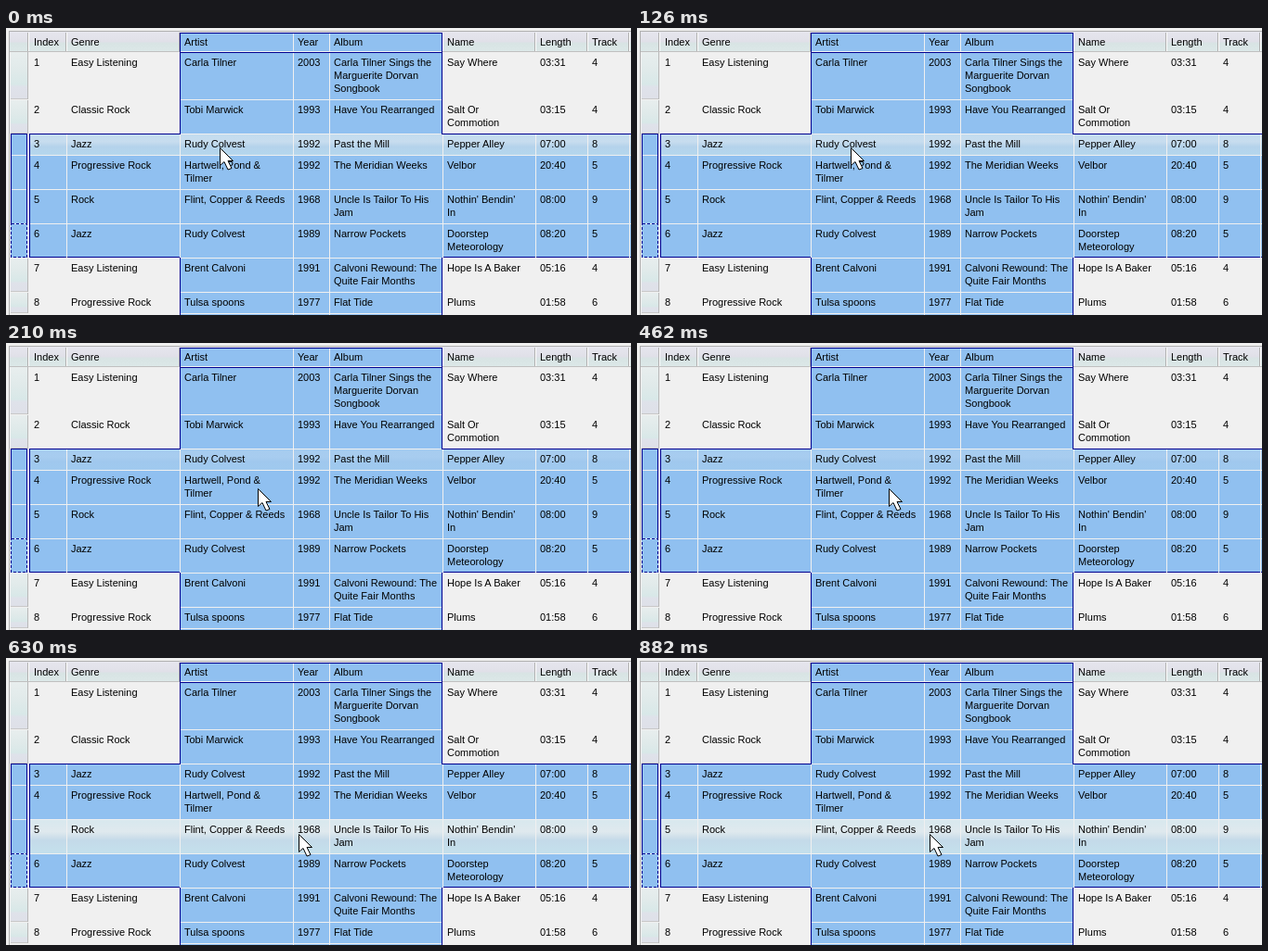
Recreate the animation shown at these times as an HTML page. Size 673 by 310 pixels, loop 1.05 s.

```html
<!DOCTYPE html>
<html lang="en">
<head>
<meta charset="utf-8">
<title>Music table</title>
<style>
html, body { margin: 0; width: 100%; height: 100%; overflow: hidden; background: #f0f0f0; }
svg { display: block; width: 673px; height: 310px; shape-rendering: crispEdges; }
text { font: 11px "Liberation Sans", Arial, sans-serif; fill: #000; white-space: pre; }
</style>
</head>
<body>
<svg id="stage" viewBox="0 0 673 310">
  <defs>
    <linearGradient id="head" x2="0" y2="1">
      <stop stop-color="#e6e6ee"/><stop offset=".5" stop-color="#e0e0e8"/>
      <stop offset=".6" stop-color="#d8e4e4"/><stop offset="1" stop-color="#dce8e8"/>
    </linearGradient>
    <linearGradient id="side" x2="0" y2="1">
      <stop stop-color="#e8eeee"/><stop offset=".4" stop-color="#e0eaea"/>
      <stop offset=".68" stop-color="#d8e8e8"/><stop offset=".74" stop-color="#dfe2ea"/><stop offset="1" stop-color="#dee0e8"/>
    </linearGradient>
    <linearGradient id="glow" x2="0" y2="1">
      <stop stop-color="#d8e8ee"/><stop offset=".35" stop-color="#dfe9ee"/>
      <stop offset=".5" stop-color="#d0e0ea"/><stop offset=".6" stop-color="#c4dae9"/><stop offset="1" stop-color="#c4e0ec"/>
    </linearGradient>
  </defs>
</svg>
<script>
const BLUE = '#90c0f0', NAVY = '#000090', LINE = '#f0f0f0';
const WIDTH = 673, HEIGHT = 310;
const columnX = [25, 65, 187, 309, 348, 470, 570, 626, 671];
const rowY = [26, 77, 114, 137, 174, 211, 248, 285, 308];
const titles = ['Index', 'Genre', 'Artist', 'Year', 'Album', 'Name', 'Length', 'Track'];
const songs = [
  ['1', 'Easy Listening', 'Carla Tilner', '2003', 'Carla Tilner Sings the\nMarguerite Dorvan\nSongbook', 'Say Where', '03:31', '4'],
  ['2', 'Classic Rock', 'Tobi Marwick', '1993', 'Have You Rearranged', 'Salt Or\nCommotion', '03:15', '4'],
  ['3', 'Jazz', 'Rudy Colvest', '1992', 'Past the Mill', 'Pepper Alley', '07:00', '8'],
  ['4', 'Progressive Rock', 'Hartwell, Pond &\nTilmer', '1992', 'The Meridian Weeks', 'Velbor', '20:40', '5'],
  ['5', 'Rock', 'Flint, Copper & Reeds', '1968', 'Uncle Is Tailor To His\nJam', "Nothin' Bendin'\nIn", '08:00', '9'],
  ['6', 'Jazz', 'Rudy Colvest', '1989', 'Narrow Pockets', 'Doorstep\nMeteorology', '08:20', '5'],
  ['7', 'Easy Listening', 'Brent Calvoni', '1991', 'Calvoni Rewound: The\nQuite Fair Months', 'Hope Is A Baker', '05:16', '4'],
  ['8', 'Progressive Rock', 'Tulsa spoons', '1977', 'Flat Tide', 'Plums', '01:58', '6']
];
const stage = document.getElementById('stage');

function add(tag, attributes) {
  const node = document.createElementNS('http://www.w3.org/2000/svg', tag);
  for (const key in attributes) node.setAttribute(key, attributes[key]);
  return stage.appendChild(node);
}
const box = (x, y, width, height, fill) => add('rect', { x, y, width, height, fill });
const across = (x1, x2, y, color) => box(x1, y, x2 - x1, 1, color);
const down = (x, y1, y2, color) => box(x, y1, 1, y2 - y1, color);
function write(text, x, y) {
  text.split('\n').forEach((line, i) => { add('text', { x, y: y + 14 * i }).textContent = line; });
}

// Header, with the selected columns
across(3, WIDTH, 3, '#b0b0b0');
down(3, 3, HEIGHT, '#b0b0b0');
box(4, 4, WIDTH, 21, 'url(#head)');
across(4, WIDTH, 25, '#c0c0c0');
[24, ...columnX.slice(1)].forEach(x => {
  down(x - 1, 5, 25, '#b0b0b0');
  down(x, 5, 25, '#fff');
});
box(187, 5, 283, 20, BLUE);
across(187, 470, 5, NAVY);
across(187, 470, 25, LINE);
[309, 348].forEach(x => down(x, 6, 25, LINE));

// Selection and hovered row
box(187, 26, 283, HEIGHT, BLUE);
box(25, 114, WIDTH, 134, BLUE);
const hover = box(26, 115, WIDTH, 22, 'url(#glow)');

// Row headers
songs.forEach((song, i) => {
  const y = rowY[i], height = rowY[i + 1] - y, selected = i > 1 && i < 6;
  box(5, y, 18, height, selected ? BLUE : 'url(#side)');
  if (!selected) {
    across(5, 23, y + height - 1, '#c8c8c8');
    down(23, y, y + height, '#b8b8b8');
  }
});

// Grid and selection borders
const rowBorder = y => {
  across(25, 187, y, NAVY);
  across(470, WIDTH, y, NAVY);
};
rowBorder(247);
columnX.slice(1).forEach(x => down(x, 26, HEIGHT, LINE));
rowY.slice(1).forEach(y => across(5, WIDTH, y, LINE));
rowBorder(114);
across(187, 470, 26, NAVY);
[187, 469].forEach(x => {
  down(x, 5, 115, NAVY);
  down(x, 248, HEIGHT, NAVY);
});
down(25, 114, 248, NAVY);
across(5, 23, 114, NAVY);
[5, 22].forEach(x => down(x, 114, 211, NAVY));
add('rect', { x: 5.5, y: 211.5, width: 17, height: 36, fill: 'none', stroke: NAVY, 'stroke-dasharray': '3 2' });

titles.forEach((title, i) => write(title, columnX[i] + 5, 19));
songs.forEach((song, row) => song.forEach((text, i) => write(text, columnX[i] + 5, rowY[row] + 15)));

const cursor = add('path', {
  d: 'M.5 1.5V20.5L5 16.5L9 25L13 23.5L9 15.5H14.5Z',
  fill: '#fff', stroke: '#000', 'shape-rendering': 'auto'
});

const poses = [
  { until: 210, x: 230, y: 128, row: 2, glow: .7 },
  { until: 630, x: 271, y: 156, row: 2, glow: .3 },
  { until: 1050, x: 315, y: 189, row: 4, glow: 1 }
];
function render(now) {
  const time = now % 1050;
  const pose = poses.find(p => time < p.until);
  cursor.setAttribute('transform', `translate(${pose.x} ${pose.y})`);
  hover.setAttribute('y', rowY[pose.row] + 1);
  hover.setAttribute('height', rowY[pose.row + 1] - rowY[pose.row] - 1);
  hover.setAttribute('opacity', pose.glow);
}
const start = performance.now();
function tick() {
  render(performance.now() - start);
  requestAnimationFrame(tick);
}
tick();
</script>
</body>
</html>
```
